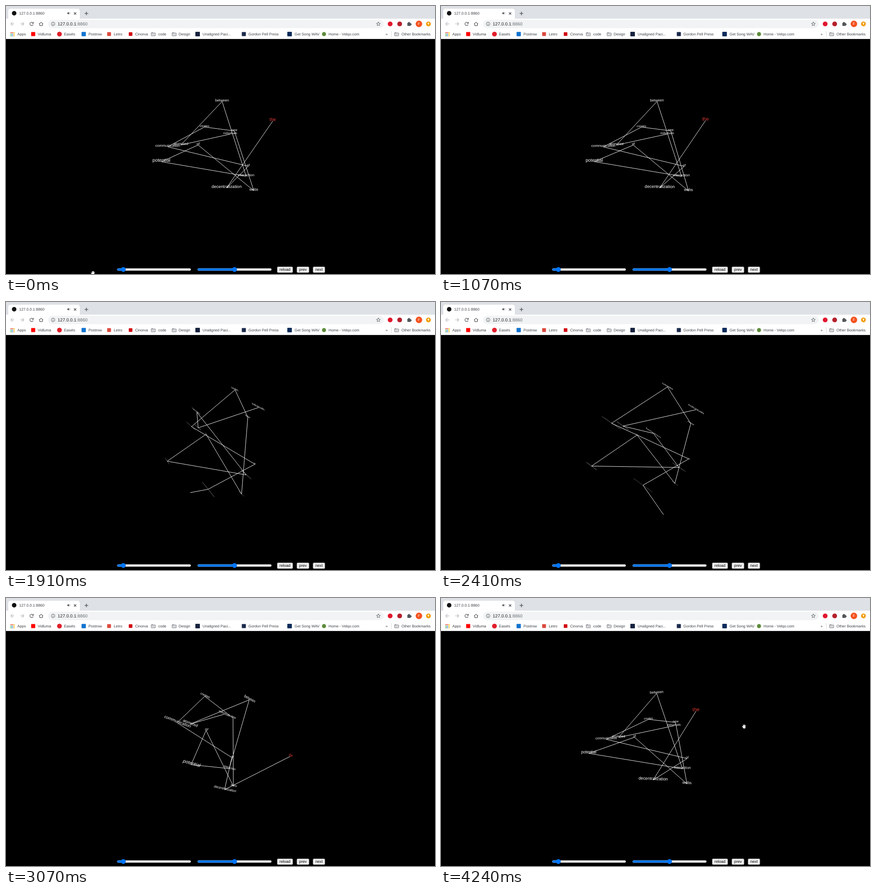
These frames come from a looping animation (947 px wide and 592 px high, 4320 ms). An HTML page:

```html
<!DOCTYPE html>
<html lang="en">
<head>
<meta charset="utf-8">
<title>Word web</title>
<style>
html, body { margin: 0; width: 100%; height: 100%; overflow: hidden; background: #000; }
svg { display: block; width: 947px; height: 592px; }
text { font-family: "Liberation Sans", Arial, sans-serif; text-rendering: geometricPrecision; white-space: pre; }
</style>
</head>
<body>
<svg id="stage" viewBox="0 0 947 592">
  <rect width="947" height="592"/>
  <g id="web"></g>
  <g id="ui"></g>
  <g id="hand"></g>
</svg>
<script>
const get = id => document.getElementById(id);
const web = get('web'), ui = get('ui'), hand = get('hand');
const LOOP = 4320, LAST = 51;
const CX = 473, CY = 332, DIST = 450, SIZE = 8, EM = 32;

// the sentence as points in space: x, y (down), z (towards the viewer)
const words = [
  ['the', 90.7, -61, 98],
  ['decentralization', 11.8, 59, 70],
  ['of', 67, 23.8, -37],
  ['communication', -114.4, -20.7, 6],
  ['creates', -43.2, -80, -106],
  ['new', 36, -65, -72],
  ['webs', 70.7, 72.6, 20],
  ['of', -49.3, -25.2, -3],
  ['potential', -99.3, 9.2, 106],
  ['interaction', 58.6, 45.2, -12.6],
  ['between', 4, -120, 4],
  ['atomized', -87.4, -25.1, -2],
  ['individuals', 27.2, -60.5, -106]
];

// view poses: step, quaternion w x y z
const poses = [
  [0, [1, 0, 0, 0]],
  [13, [1, 0, -0.025, 0]],
  [23, [0.764, -0.427, -0.481, 0.047]],
  [29, [0.765, -0.566, -0.257, 0.169]],
  [37, [0.933, -0.18, 0.238, 0.199]],
  [43, [0.955, 0.066, 0.243, 0.157]],
  [51, [0.994, 0, -0.111, 0]]
];

function add(parent, tag, attrs, text) {
  const el = document.createElementNS('http://www.w3.org/2000/svg', tag);
  set(el, attrs);
  if (text) el.textContent = text;
  return parent.appendChild(el);
}

function set(el, attrs) {
  for (const k in attrs) el.setAttribute(k, attrs[k]);
}

function line(color, width, points, parent = ui) {
  return add(parent, 'polyline', { points: points.join(' '), fill: 'none', stroke: color, 'stroke-width': width });
}

function box(x, y, width, height, fill, rx = 0, edge = 'none', parent = ui) {
  add(parent, 'rect', { x, y, width, height, fill, rx, stroke: edge, 'stroke-width': 0.7 });
}

function dot(cx, cy, r, fill) {
  add(ui, 'circle', { cx, cy, r, fill });
}

function arc(x, y, r, color, width, from, to) {
  const at = a => `${x + r * Math.cos(a)} ${y + r * Math.sin(a)}`;
  const d = `M${at(from)}A${r} ${r} 0 ${to - from > Math.PI ? 1 : 0} 1 ${at(to)}`;
  add(ui, 'path', { d, fill: 'none', stroke: color, 'stroke-width': width });
}

function label(text, x, y, size, fill = '#3c4043', anchor = 'start') {
  return add(ui, 'text', { x, y: y + size * 0.35, 'font-size': size, fill, 'text-anchor': anchor }, text);
}

// ---- turning web of words

function slope(i, k) {
  if (i >= poses.length - 1) return 0;
  const a = poses[i < 2 ? 0 : i - 1], b = poses[i < 2 ? 1 : i + 1];
  return (b[1][k] - a[1][k]) / (b[0] - a[0]);
}

function pose(step) {
  let i = 0;
  while (i < poses.length - 2 && step >= poses[i + 1][0]) i++;
  const [t0, a] = poses[i], [t1, b] = poses[i + 1];
  const h = t1 - t0, t = (step - t0) / h, t2 = t * t, t3 = t2 * t;
  const q = a.map((v, k) =>
    (2 * t3 - 3 * t2 + 1) * v + (t3 - 2 * t2 + t) * h * slope(i, k) +
    (3 * t2 - 2 * t3) * b[k] + (t3 - t2) * h * slope(i + 1, k));
  const n = Math.hypot(...q);
  return q.map(v => v / n);
}

function matrix([w, x, y, z]) {
  return [
    [1 - 2 * (y * y + z * z), 2 * (x * y - w * z), 2 * (x * z + w * y)],
    [2 * (x * y + w * z), 1 - 2 * (x * x + z * z), 2 * (y * z - w * x)],
    [2 * (x * z - w * y), 2 * (y * z + w * x), 1 - 2 * (x * x + y * y)]
  ];
}

function project(m, x, y, z) {
  const [px, py, pz] = m.map(r => r[0] * x + r[1] * y + r[2] * z);
  const s = DIST / (DIST - pz);
  return { x: CX + px * s, y: CY + py * s, s };
}

const thread = line('#eee', 1, [], web);
const marks = words.map(([text, x, y, z], i) => {
  const edge = line('#fff', 0.9, [], web);
  const el = add(web, 'text', { 'font-size': EM, 'text-anchor': 'middle', fill: i ? '#fff' : '#e23a36' }, text);
  return { el, edge, x, y, z, red: !i, half: el.getComputedTextLength() * SIZE / EM / 2 };
});

function drawWord(m, w, p) {
  // local perspective of the text plane around its anchor
  const dir = k => [
    p.s * (m[0][k] + (p.x - CX) * m[2][k] / DIST),
    p.s * (m[1][k] + (p.y - CY) * m[2][k] / DIST)
  ];
  const [ax, ay] = dir(0), [bx, by] = dir(1), k = SIZE / EM;
  const open = Math.abs(ax * by - ay * bx) / (p.s * p.s);
  const form = [ax * k, ay * k, bx * k, by * k, p.x, p.y].map(v => v.toFixed(4));
  set(w.el, {
    transform: `matrix(${form})`,
    visibility: w.red && open < 0.08 ? 'hidden' : 'visible'
  });
  // a word seen edge-on is a faint line
  const a = project(m, w.x - w.half, w.y, w.z), b = project(m, w.x + w.half, w.y, w.z);
  set(w.edge, {
    points: [a.x, a.y, b.x, b.y].join(' '),
    opacity: w.red ? 0 : 0.6 * Math.max(0, 1 - open / 0.1)
  });
}

function draw(step) {
  const m = matrix(pose(step));
  const pts = marks.map(w => project(m, w.x, w.y, w.z));
  set(thread, { points: pts.map(p => p.x + ',' + p.y).join(' ') });
  marks.forEach((w, i) => drawWord(m, w, pts[i]));
  const early = step === 0, late = step >= LAST - 1;
  set(hand, {
    visibility: early || late ? 'visible' : 'hidden',
    transform: early ? 'translate(192 590)' : 'translate(669 284)'
  });
}

// ---- browser window

function folder(x) {
  box(x - 4.5, 58.5, 4.5, 3, '#5f6368', 1);
  box(x - 4.5, 59.5, 9.5, 6.5, '#d4d6d9', 1, '#5f6368');
}

function arrow(x, dir, color) {
  line(color, 1.1, [x - 4 * dir, 39.5, x + 4 * dir, 39.5]);
  line(color, 1.1, [x, 35.5, x + 4 * dir, 39.5, x, 43.5]);
}

function drawTabs() {
  const gray = '#4a4d51';
  box(0, 0, 947, 28, '#dee1e6');
  box(5, 6, 158, 30, '#fff', 5);
  dot(18, 16, 5, '#111');
  label('127.0.0.1:8860', 29, 16, 8.4);
  add(ui, 'path', { d: 'M135 15h1.5L139 13v6l-2.5-2H135z', fill: gray });
  arc(139, 16, 2.3, gray, 0.7, -0.9, 0.9);
  line(gray, 1.2, [150, 14, 155, 19]);
  line(gray, 1.2, [155, 14, 150, 19]);
  line(gray, 1.3, [173.5, 16.5, 181.5, 16.5]);
  line(gray, 1.3, [177.5, 12.5, 177.5, 20.5]);
}

function drawToolbar() {
  const gray = '#54575b';
  box(0, 28, 947, 45, '#fff');
  arrow(14.5, -1, '#b4b7ba');
  arrow(35.5, 1, '#b4b7ba');
  arc(56.5, 39.5, 3.7, gray, 1.2, 0.3, 5.6);
  line(gray, 1.2, [60.5, 35, 60.5, 38.3, 57.2, 38.3]);
  line(gray, 1.1, [73, 40, 77.5, 35.7, 82, 40]);
  line(gray, 1.1, [74.6, 39, 74.6, 43.4, 80.4, 43.4, 80.4, 39]);
  box(93, 30.5, 741, 18.5, '#f1f3f4', 9.2);
  add(ui, 'circle', { cx: 104, cy: 39.5, r: 4, fill: 'none', stroke: gray, 'stroke-width': 0.9 });
  line(gray, 1, [104, 39, 104, 42]);
  line(gray, 1, [104, 37, 104, 38]);
  const address = label('127.0.0.1', 114, 39.5, 9.9, '#202124');
  add(address, 'tspan', { fill: '#6a6e73' }, ':8860');

  const star = [];
  for (let i = 0; i <= 10; i++) {
    const r = i % 2 ? 2 : 4.6, a = i * Math.PI / 5 - Math.PI / 2;
    star.push(822 + r * Math.cos(a), 39.7 + r * Math.sin(a));
  }
  line(gray, 0.9, star);

  dot(848, 39.5, 5.3, '#e0172d');
  dot(869, 39.5, 5.3, '#b5202c');
  box(886, 37, 7.5, 7, gray, 1);
  dot(889.5, 36.8, 1.7, gray);
  dot(893.8, 40.5, 1.7, gray);
  dot(911.5, 39.5, 7.2, '#f4511e');
  label('F', 911.5, 39.5, 8, '#fff', 'middle');
  dot(932.5, 39.5, 5.2, '#f29900');
  line('#fff', 1.2, [932.5, 42, 932.5, 37.5]);
  line('#fff', 1.2, [930.5, 39.2, 932.5, 37.2, 934.5, 39.2]);
}

function drawBookmarks() {
  const tints = ['#ea4335', '#ea4335', '#fbbc04', '#34a853', '#4285f4', '#fbbc04', '#34a853', '#4285f4', '#fbbc04'];
  tints.forEach((c, i) => box(10 + i % 3 * 3.4, 57.8 + Math.floor(i / 3) * 3.4, 2.2, 2.2, c));
  dot(118, 62, 5.3, '#e0202b');
  dot(702, 62, 4.5, '#5d8c3c');
  for (const [x, w, c] of [[60, 9, '#f00'], [171.5, 9.5, '#1273cf'], [227.5, 8.5, '#dc4a3e'],
    [275, 8, '#d20a13'], [423, 10, '#17233f'], [525, 9, '#1c2b4c'], [626, 10, '#0c2d5c']])
    box(x - w / 2, 62 - w / 2, w, w, c, 1);
  [325, 371, 862].forEach(folder);
  for (const [text, x] of [['Apps', 25], ['Vidluma', 70], ['Easels', 128], ['Postrow', 182],
    ['Letro', 238], ['Cinorva', 285], ['code', 336], ['Design', 381], ['Unaligned Paci...', 434],
    ['Gordon Pell Press', 535], ['Get Song WAV', 637], ['Home - Velqo.com', 712],
    ['»', 838], ['Other Bookmarks', 873]])
    label(text, x, 61.8, 8.25);
  line('#c9ccd0', 0.8, [850.5, 56, 850.5, 68]);
  line('#dfe1e4', 1, [0, 72.5, 947, 72.5]);
}

function slider(x, w, at) {
  box(x, 579.8, w, 4.6, '#efefef', 2.3, '#b2b2b2');
  box(x, 579.8, at - x, 4.6, '#0075ff', 2.3);
  dot(at, 582.1, 5.3, '#0075ff');
}

function button(text, x, w) {
  box(x, 576, w, 13, '#efefef', 2, '#767676');
  label(text, x + w / 2, 582.3, 8.7, '#000', 'middle');
}

function drawControls() {
  slider(245.5, 162.5, 259);
  slider(423, 163, 504.5);
  button('reload', 598.7, 34.3);
  button('prev', 642, 27);
  button('next', 677.7, 26.3);
}

function drawHand() {
  set(hand, { 'stroke-linecap': 'round' });
  for (const [x, top] of [[-2, -3.2], [-0.3, -4], [1.4, -3.6], [3, -2.4]])
    line('#fff', 1.3, [x, top, x * 0.7, 1], hand);
  line('#fff', 1.4, [-3.8, -0.3, -1.5, 2.2], hand);
  box(-2, -0.5, 5, 4.8, '#fff', 1.6, 'none', hand);
}

drawTabs();
drawToolbar();
drawBookmarks();
drawControls();
drawHand();

let shown = -1;
function tick() {
  const t = performance.now() % LOOP;
  // the picture advances twelve times a second
  const step = Math.min(LAST, Math.floor((t + 17) * 0.012));
  if (step !== shown) draw(shown = step);
  requestAnimationFrame(tick);
}
tick();
</script>
</body>
</html>
```
